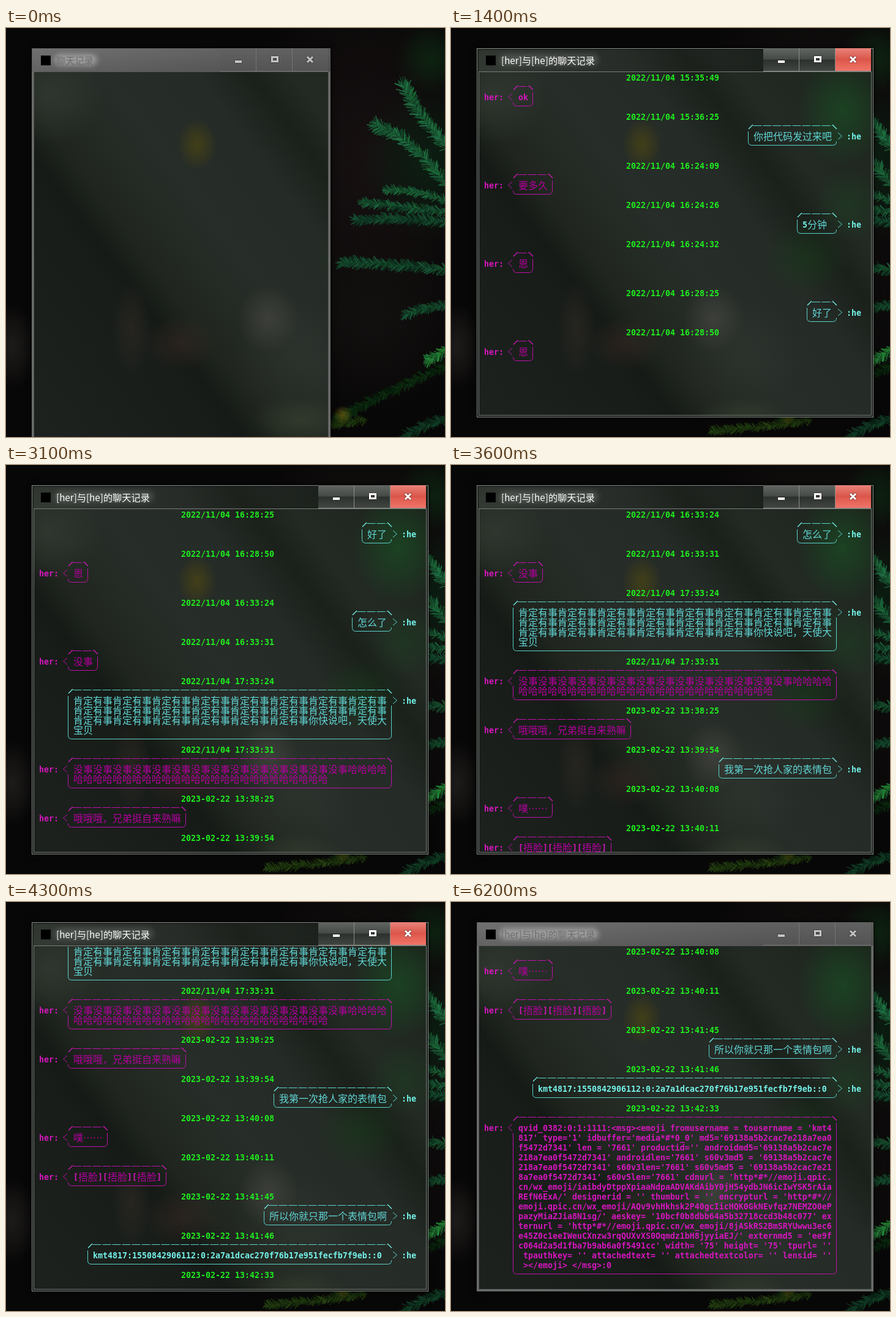
An HTML page with a canvas for the animation above (6300 ms loop, 717 by 668 pixels).

```html
<!DOCTYPE html>
<html lang="zh-CN">
<head>
<meta charset="utf-8">
<title>聊天记录</title>
<style>
html, body { margin: 0; width: 100%; height: 100%; overflow: hidden; background: #080707; }
#stage { position: absolute; left: 0; top: 0; width: 717px; height: 668px; overflow: hidden; }
canvas, #win, #win > * { position: absolute; }
#photo { left: 0; top: 0; }
#win { left: 42px; top: 33px; width: 648px; height: 603px; overflow: hidden; box-shadow: 0 0 8px 1px rgba(0,0,0,.7); }
#win.small { width: 488px; height: 700px; }
#glass { left: -42px; top: -33px; }

.bar { left: 0; right: 0; top: 0; height: 39px; background: linear-gradient(90deg, rgba(70,74,70,.35), rgba(15,17,15,.35) 75%); }
.frame { inset: 0; box-shadow: inset 0 0 0 1px #858a86, inset 0 0 0 3px rgba(20,22,20,.6); }
.edge { left: 3px; top: 38px; right: 3px; bottom: 3px; box-shadow: inset 0 0 0 1px #787d79; }
.off .bar { background: linear-gradient(rgba(255,255,255,.06), rgba(0,0,0,.05)), linear-gradient(90deg, #686868, #515151); }
.off .frame { box-shadow: inset 0 0 0 1px #5a5a5a; }
.off .edge { box-shadow: inset 0 0 0 1px #595b59, 0 0 0 3px #696b69; clip-path: inset(0 -3px -3px -3px); }

.icon { left: 15px; top: 12px; width: 16px; height: 16px; background: #000; }
.title { left: 40px; top: 7px; font: 15.2px/24px "Noto Sans CJK SC", "Noto Sans CJK", sans-serif; color: #fff; white-space: nowrap; }
.title::before { content: ""; position: absolute; inset: 3px -6px 3px -3px; background: rgba(190,195,190,.22); border-radius: 9px; filter: blur(4px); z-index: -1; }
.off .title { color: #6c6c6c; }
.off .title::before { background: rgba(175,175,175,.75); }
.title { z-index: 0; }

.btns { right: 4px; top: 0; display: flex; gap: 1px; background: #8a8d8a; padding: 0 0 1px 1px; margin-right: 0; }
.btns svg { display: block; width: 58px; height: 37px; background: linear-gradient(#626663, #464a47 48%, #2d312e 52%, #424643); }
.btns svg:first-child { margin-left: -1px; }
.btns .x { background: linear-gradient(#e8837a, #da5549 50%, #e05a4e 55%, #ef7468); }
.btns g { fill: #fff; stroke: #fff; stroke-width: 0; filter: drop-shadow(0 0 1px #222); }
.btns path { fill: none; stroke-width: 3; }
.off .btns { background: #747474; }
.off .btns svg, .off .btns .x { background: linear-gradient(#616161, #545454); }
.off .btns g { fill: #c4c4c4; stroke: #c4c4c4; }

#screen { left: 4px; top: 40px; width: 640px; overflow: hidden; }
#log { display: block; }
#log text { white-space: pre; }
.a { font: bold 13.29px "DejaVu Sans Mono", "Liberation Mono", monospace; }
.c { font: 300 16px "Noto Sans CJK SC", "Noto Sans CJK", sans-serif; }
.date { fill: #1fee1f; }
.her { --text: #d416bc; --thin: #b4009e; --line: #c010aa; }
.he { --text: #74f3ea; --thin: #61d6d6; --line: #5cd2cc; }
.her .a, .he .a { fill: var(--text); }
.her .c, .he .c { fill: var(--thin); }
.bub { fill: none; stroke: var(--line); }
.dash { stroke-dasharray: 14 2; }
.slash { stroke: var(--text); stroke-width: 1.3; }
</style>
</head>
<body>
<div id="stage">
  <canvas id="photo" width="717" height="668"></canvas>
  <div id="win" class="small off">
    <canvas id="glass" width="717" height="668"></canvas>
    <div class="bar"></div>
    <div class="frame"></div>
    <div class="edge"></div>
    <div class="icon"></div>
    <div class="title" id="title"></div>
    <div class="btns">
      <svg><g><rect x="24" y="20" width="11" height="4"/></g></svg>
      <svg><g><path d="M25.5 14.5h9v7h-9z"/></g></svg>
      <svg class="x"><g><path d="M24 14l9 9M33 14l-9 9"/></g></svg>
    </div>
    <div id="screen"><svg id="log" width="640" height="1520"></svg></div>
  </div>
</div>
<script>
const $ = id => document.getElementById(id);

// ---------- backdrop ----------
let seed = 7;
const rnd = () => (seed = (seed * 16807) % 2147483647) / 2147483647;

function blob(g, x, y, rx, ry, rgb, alpha) {
  g.save();
  g.translate(x, y);
  g.scale(rx, ry);
  const f = g.createRadialGradient(0, 0, 0, 0, 0, 1);
  f.addColorStop(0, `rgba(${rgb},${alpha})`);
  f.addColorStop(.5, `rgba(${rgb},${alpha * .55})`);
  f.addColorStop(1, `rgba(${rgb},0)`);
  g.fillStyle = f;
  g.fillRect(-1, -1, 2, 2);
  g.restore();
}

// fir twig: tip, bend, base, needle length, hue, lightness
function twig(g, x0, y0, x1, y1, x2, y2, len, hue, light) {
  const n = Math.hypot(x2 - x0, y2 - y0) * 2.6;
  for (let i = n; i >= 0; i--) {
    const t = i / n, u = 1 - t;
    const x = u * u * x0 + 2 * u * t * x1 + t * t * x2;
    const y = u * u * y0 + 2 * u * t * y1 + t * t * y2;
    const dir = Math.atan2(u * (y0 - y1) + t * (y1 - y2), u * (x0 - x1) + t * (x1 - x2));
    const a = dir + (rnd() - .5) * 2.1, l = len * (.6 + rnd() * .5);
    g.strokeStyle = `hsl(${hue + rnd() * 14},${48 + rnd() * 14}%,${light * (.45 + rnd() * .8)}%)`;
    g.lineWidth = 1 + rnd() * .8;
    g.beginPath();
    g.moveTo(x, y);
    g.lineTo(x + Math.cos(a) * l, y + Math.sin(a) * l);
    g.stroke();
  }
}

const p = $('photo').getContext('2d');
p.fillStyle = '#080707';
p.fillRect(0, 0, 717, 668);
blob(p, 590, 220, 200, 330, '24,17,18', .9);
blob(p, 600, 480, 150, 150, '20,18,17', .8);
blob(p, 10, 520, 40, 70, '50,48,45', .5);
blob(p, 695, 50, 60, 60, '14,52,22', .6);
blob(p, 690, 220, 110, 130, '8,45,22', .55);
[
  [650, 95, 675, 150, 725, 195, 17, 138, 25],
  [605, 160, 660, 175, 725, 262, 17, 138, 25],
  [622, 265, 670, 262, 725, 285, 11, 138, 23],
  [585, 285, 640, 292, 725, 300, 12, 140, 21],
  [572, 314, 640, 308, 725, 318, 13, 142, 18],
  [550, 383, 630, 384, 725, 396, 14, 140, 19],
  [654, 468, 685, 455, 725, 452, 12, 140, 20],
  [540, 640, 590, 610, 725, 550, 13, 120, 11],
  [690, 542, 705, 535, 725, 522, 14, 125, 31],
  [645, 672, 680, 645, 725, 638, 13, 140, 15],
  [428, 657, 490, 655, 590, 640, 11, 90, 14]
].forEach(b => twig(p, ...b));
blob(p, 550, 632, 16, 16, '130,115,20', .6);

const g = $('glass').getContext('2d');
const band = g.createLinearGradient(-320, 240, 400, -300);
[[0, '#1e2320'], [.3, '#181d19'], [.345, '#151a16'], [.4, '#20261f'], [.53, '#272d28'],
 [.67, '#252b26'], [.75, '#1a201a'], [.81, '#232a24'], [1, '#1c241c']].forEach(s => band.addColorStop(...s));
g.fillStyle = band;
g.fillRect(0, 0, 717, 668);
blob(g, 70, 110, 90, 80, '75,88,78', .3);
blob(g, 312, 190, 32, 42, '88,78,12', .55);
blob(g, 428, 475, 50, 55, '88,86,80', .45);
blob(g, 285, 515, 60, 45, '66,44,40', .45);
blob(g, 205, 490, 32, 80, '60,48,42', .4);
blob(g, 640, 135, 75, 90, '24,92,38', .5);
blob(g, 650, 290, 60, 60, '26,76,34', .35);
blob(g, 580, 375, 70, 60, '20,66,24', .4);
blob(g, 480, 640, 80, 40, '80,96,68', .3);
blob(g, 470, 540, 100, 100, '60,66,58', .25);

// ---------- chat log ----------
const HASH = '69138a5b2cac7e218a7ea0f5472d7341';
const XML = `qvid_0382:0:1:1111:<msg><emoji fromusername = tousername = 'kmt4817' type='1' idbuffer='media*#*0_0' md5='${HASH}' len = '7661' productid='' androidmd5='${HASH}' androidlen='7661' s60v3md5 = '${HASH}' s60v3len='7661' s60v5md5 = '${HASH}' s60v5len='7661' cdnurl = 'http*#*//emoji.qpic.cn/wx_emoji/iaibdyDtppXpiaaNdpaADVAKdAibY0jH54ydbJN6icIwYSK5rAiaREfN6ExA/' designerid = '' thumburl = '' encrypturl = 'http*#*//emoji.qpic.cn/wx_emoji/AQv9vhHkhsk2P40gcIicHQK0GkNEvfqz7NEMZO0ePpazyMiaZJia8N1sg/' aeskey= '10bcf0b8dbb64a5b32718ccd3b48c077' externurl = 'http*#*//emoji.qpic.cn/wx_emoji/8jASkRS2BmSRYUwwu3ec6e45Z0c1eeIWeuCXnzw3rqQUXvXS0Oqmdz1bH8jyyiaEJ/' externmd5 = 'ee9fc064d2a5d1fba7b9ab6a0f5491cc' width= '75' height= '75' tpurl= '' tpauthkey= '' attachedtext= '' attachedtextcolor= '' lensid= '' ></emoji> </msg>:0`;

// row of the date line, date, speaker, message
const CHAT = [
  [0, '2022/11/04 15:35:49', 'her', 'ok'],
  [4, '2022/11/04 15:36:25', 'he', '你把代码发过来吧'],
  [9, '2022/11/04 16:24:09', 'her', '要多久'],
  [13, '2022/11/04 16:24:26', 'he', '5分钟'],
  [17, '2022/11/04 16:24:32', 'her', '恩'],
  [22, '2022/11/04 16:28:25', 'he', '好了'],
  [26, '2022/11/04 16:28:50', 'her', '恩'],
  [31, '2022/11/04 16:33:24', 'he', '怎么了'],
  [35, '2022/11/04 16:33:31', 'her', '没事'],
  [39, '2022/11/04 17:33:24', 'he', '肯定有事'.repeat(22) + '你快说吧，天使大宝贝'],
  [46, '2022/11/04 17:33:31', 'her', '没事'.repeat(14) + '哈'.repeat(30)],
  [51, '2023-02-22 13:38:25', 'her', '哦哦哦，兄弟挺自来熟嘛'],
  [55, '2023-02-22 13:39:54', 'he', '我第一次抢人家的表情包'],
  [59, '2023-02-22 13:40:08', 'her', '噗……'],
  [63, '2023-02-22 13:40:11', 'her', '[捂脸]'.repeat(3)],
  [67, '2023-02-22 13:41:45', 'he', '所以你就只那一个表情包啊'],
  [71, '2023-02-22 13:41:46', 'he', 'kmt4817:1550842906112:0:2a7a1dcac270f76b17e951fecfb7f9eb::0'],
  [75, '2023-02-22 13:42:33', 'her', XML]
];

const cells = s => [...s].reduce((n, ch) => n + (ch > '\x7f' ? 2 : 1), 0);
const esc = s => s.replace(/&/g, '&amp;').replace(/</g, '&lt;');

function wrap(s) {
  const out = [''];
  for (const ch of s) {
    if (cells(out[out.length - 1] + ch) > 64) out.push('');
    out[out.length - 1] += ch;
  }
  return out;
}

function put(col, row, s) {
  return s.match(/[\x00-\x7f]+|[^\x00-\x7f]+/g).map(run => {
    const wide = run > '\x7f', x = col * 8;
    col += cells(run);
    return `<text class="${wide ? 'c' : 'a'}" x="${x}" y="${row * 16 + (wide ? 14 : 12.5)}">${esc(run)}</text>`;
  }).join('');
}

function bubble(who, row, s) {
  const lines = wrap(s), her = who === 'her';
  const w = Math.ceil(cells(lines[0]) / 2) * 2, col = her ? 8 : 72 - w;
  const l = col * 8 - 8.5, r = (col + w) * 8 + 7.5;
  const y = row * 16, t = y - 9.5, b = y + lines.length * 16 + 6.5;
  const yl = her ? y + 16 : y, yr = her ? y : y + 16;
  const tail = her ? `M${l - 1.5} ${y + 2}l-6.5 5.5l6.5 5.5` : `M${r + 2.5} ${y + 2}l6.5 5.5l-6.5 5.5`;
  return `<g class="${who}">` +
    `<path class="bub dash" d="M${l + 8} ${t}H${r - 7}"/>` +
    `<path class="bub slash" d="M${l + .5} ${t + 5.5}l7 -7M${r - 6.5} ${t - 1.5}l7 7"/>` +
    `<path class="bub" d="M${l} ${yl}V${b - 6}Q${l} ${b} ${l + 6} ${b}H${r - 6}Q${r} ${b} ${r} ${b - 6}V${yr}${tail}"/>` +
    (her ? put(1, row, 'her:') : put(75, row, ':he')) +
    lines.map((s, i) => put(col, row + i, s)).join('') + '</g>';
}

$('log').innerHTML = CHAT.map(([row, date, who, s]) =>
  `<g class="date">${put(30, row, date)}</g>` + bubble(who, row + 2, s)).join('');

// ---------- playback ----------
// time in 100 ms, last finished row; a half means the next row is out but not yet ended
const STEPS = [
  [0, -1], [4, 3], [5, 4], [6, 7], [7, 9], [8, 12], [9, 13], [10, 16], [11, 17], [12, 22],
  [13, 25], [14, 29], [15, 31], [16, 34], [17, 35], [19, 38], [22, 39], [23, 45], [24, 46],
  [27, 47.5], [28, 50], [29, 51], [30, 54], [31, 55], [32, 58], [33, 59], [34, 62], [35, 63],
  [36, 64.5], [37, 66], [38, 67], [39, 70], [40, 71], [41, 72.5], [42, 74], [43, 75],
  [45, 78.5], [46, 81.5], [47, 84.5], [48, 87.5], [49, 90.5], [50, 92]
];
const LOOP = 6300, ROWS = 35;

function draw() {
  const t = performance.now() % LOOP;
  const small = t < 300, off = t < 100 || t >= 6200;
  $('win').className = (small ? 'small ' : '') + (off ? 'off' : '');
  $('title').textContent = small ? '聊天记录' : '[her]与[he]的聊天记录';
  let last = -1;
  for (const [at, row] of STEPS) if (t >= at * 100) last = row;
  const top = Math.max(0, Math.floor(last) + 2 - ROWS);
  $('screen').style.height = (Math.ceil(last) + 1 - top) * 16 + 'px';
  $('log').style.transform = `translateY(${-top * 16}px)`;
  requestAnimationFrame(draw);
}
draw();
</script>
</body>
</html>
```
